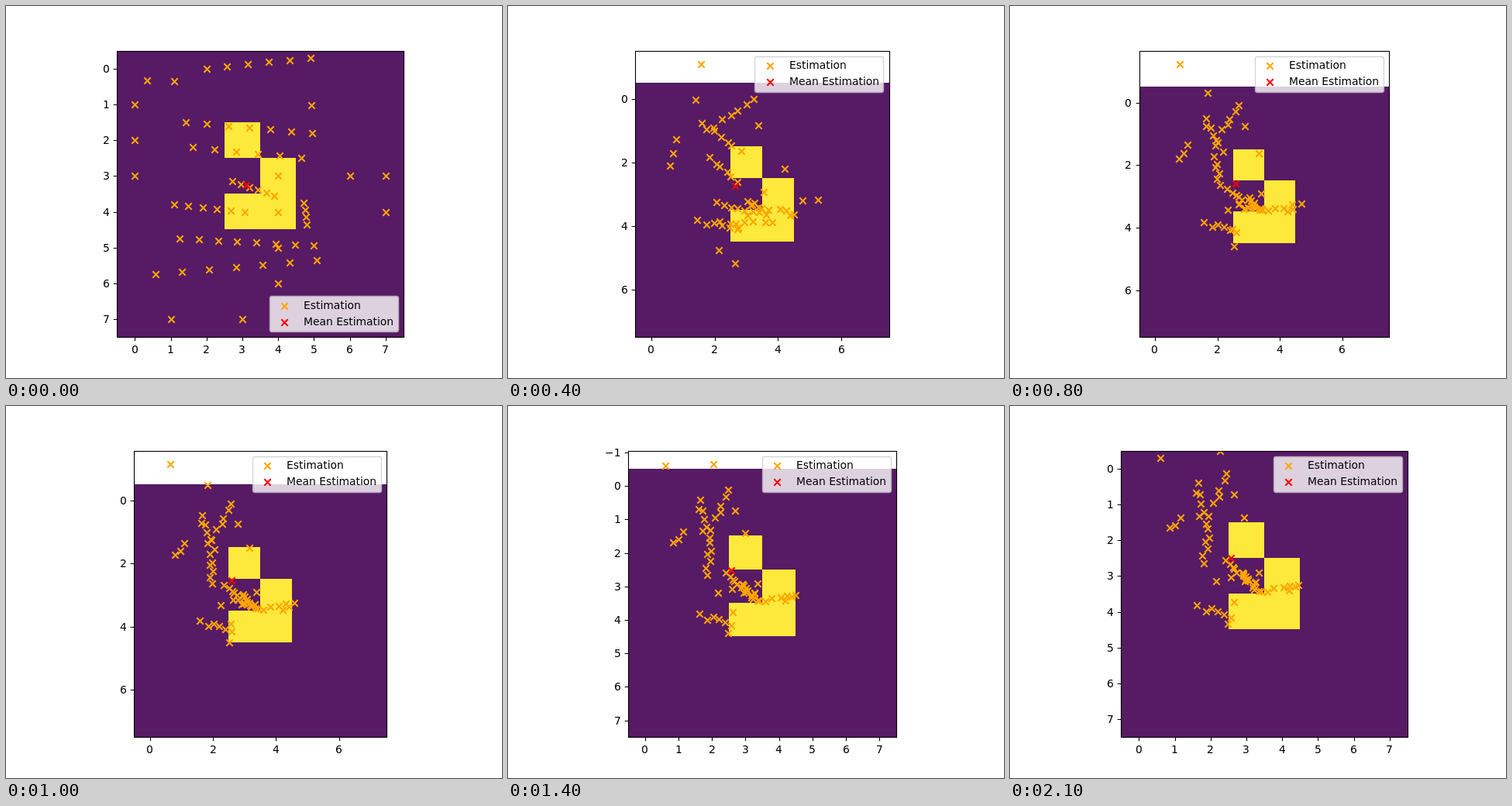
These frames come from a looping animation (640 by 480 pixels, 2200 ms). An HTML page:

```html
<!DOCTYPE html>
<html lang="en">
<head>
<meta charset="utf-8">
<title>Estimation scatter</title>
<style>
  html, body { margin: 0; width: 100%; height: 100%; overflow: hidden; background: #fff; }
  svg { display: block; width: 640px; height: 480px; }
  text { font: 13.89px "DejaVu Sans", sans-serif; fill: #000; }
  .x { fill: none; stroke-width: 2.08; }
  .axis { fill: none; stroke: #000; stroke-width: 1.11; }
</style>
</head>
<body>
<svg id="plot" viewBox="0 0 640 480"></svg>
<script>
const LOOP = 2200, STEP = 100;
const TOP = 57.6, BOTTOM = 427.2, CENTER = 328;
const BACK = '#571a65', CELL = '#fde93b', ORANGE = '#ffa500', RED = '#f00';
const DIGIT = 8.84, MINUS = 11.64;
const LEGEND = { w: 166.35, h: 46.1, gap: 6.94 };
const SETTLE = 350, SPREAD = 0.2;

let seed = 7;
const random = () => (seed = seed * 16807 % 2147483647) / 2147483647;
const lerp = (a, b, k) => a.map((v, i) => v + (b[i] - v) * k);
const settle = (t, tau) => 1 - Math.exp(-t / tau);

// A strand is n points spread evenly on a line that travels to a second line.
function strand(n, [a, b], [c, d]) {
  return Array.from({ length: n }, (_, i) => ({
    from: lerp(a, b, i / (n - 1)),
    to: lerp(c, d, i / (n - 1)).map(v => v + (random() - 0.5) * SPREAD)
  }));
}

const points = [
  // rows of the starting grid
  strand(6, [[2, 0], [4.9, -0.3]], [[2.05, 1.25], [2.4, 0.1]]),
  strand(7, [[1.43, 1.5], [4.95, 1.8]], [[1.6, 0.45], [1.78, 1.5]]),
  strand(6, [[1.62, 2.2], [4.65, 2.5]], [[1.9, 1.65], [1.82, 2.69]]),
  strand(6, [[2.73, 3.15], [3.9, 3.55]], [[3.1, 3.25], [3.5, 3.54]]),
  strand(6, [[1.1, 3.8], [3.07, 4]], [[1.65, 3.85], [2.6, 4.15]]),
  strand(8, [[1.25, 4.75], [5, 4.95]], [[2.4, 2.6], [2.95, 3.05]]),
  strand(7, [[0.57, 5.75], [5.07, 5.35]], [[2.95, 3], [3.2, 3.25]]),
  strand(2, [[1, 7], [3, 7]], [[2.66, 3.7], [2.55, 4.25]]),
  // columns and the right-hand fringe
  strand(3, [[0, 1], [0, 3]], [[1.08, 1.3], [0.8, 1.7]]),
  strand(4, [[4, 3], [4, 6]], [[3.44, 2.95], [2.1, 3.15]]),
  strand(4, [[4.72, 3.75], [4.8, 4.35]], [[3.72, 3.4], [4.45, 3.3]]),
  strand(2, [[6, 3], [7, 3]], [[4.3, 3.2], [4.41, 3.17]]),
  strand(2, [[4.93, 1.03], [7, 4]], [[2.75, 0.64], [2.98, 1.26]])
].flat();

// Two scouts leave the grid and stretch the y axis; keys are [time, x, y].
const scouts = [
  [[0, 0.34, 0.33], [200, 2.24, -0.89], [600, 0.92, -1.31], [1000, 0.65, -1.148],
    [1400, 0.61, -0.61], [2100, 0.6, -0.3]],
  [[0, 1.1, 0.35], [1000, 1.84, -0.48], [1400, 2.04, -0.648], [1800, 2.22, -0.6], [2100, 2.27, -0.49]]
];

function along(keys, t) {
  const i = Math.max(1, keys.findIndex(k => k[0] >= t));
  const [a, b] = [keys[i - 1], keys[i]];
  return lerp(a, b, (t - a[0]) / (b[0] - a[0])).slice(1);
}

function cloudAt(t) {
  const k = settle(t, SETTLE);
  return [...points.map(p => lerp(p.from, p.to, k)), ...scouts.map(s => along(s, t))];
}

const meanAt = t => [3.12 - 0.54 * settle(t, 200), 3.26 - 0.76 * settle(t, SETTLE)];

// Equal-aspect axes: x runs from -0.5 to 7.5, y from top down to 7.5.
function axes(top) {
  const s = (BOTTOM - TOP) / (7.5 - top);
  return {
    top, s, left: CENTER - 4 * s, right: CENTER + 4 * s,
    x: v => CENTER + (v - 3.5) * s,
    y: v => TOP + (v - top) * s
  };
}

const snap = v => Math.round(v) + 0.5;
const cross = (x, y) => `M${snap(x) - 4.17} ${snap(y) - 4.17}l8.34 8.34m0-8.34l-8.34 8.34`;
const marks = (color, d) => `<path class="x" stroke="${color}" d="${d}"/>`;
const label = (x, y, str) => `<text x="${Math.round(x)}" y="${Math.round(y)}">${str}</text>`;

function block(ax, x0, y0, x1, y1, color) {
  const [l, r] = [x0, x1].map(v => Math.round(ax.x(v)));
  const [t, b] = [y0, y1].map(v => Math.floor(ax.y(v)));
  return `<rect x="${l}" y="${t}" width="${r - l}" height="${b - t}" fill="${color}"/>`;
}

function ticks(ax) {
  const xStep = ax.s * 8 * 0.72 / 30 < 8 ? 2 : 1;
  const yStep = 7.5 - ax.top > 9 ? 2 : 1;
  let d = '', text = '';
  for (let v = 0; v < 7.5; v += xStep) {
    d += `M${snap(ax.x(v))} 427.5v4.86`;
    text += label(ax.x(v) - DIGIT / 2, 448, v);
  }
  for (let v = Math.ceil(ax.top / yStep) * yStep; v < 7.5; v += yStep) {
    const width = DIGIT + (v < 0 ? MINUS : 0);
    d += `M${snap(ax.left)} ${snap(ax.y(v))}h-4.86`;
    text += label(ax.left - 9.72 - width, ax.y(v) + 5, (v < 0 ? '\u2212' : '') + Math.abs(v));
  }
  return `<path class="axis" d="${d}"/>` + text;
}

// The legend takes the corner that covers the fewest points.
function legend(ax, dots) {
  const { w, h, gap } = LEGEND;
  const l = ax.left + gap, r = ax.right - gap - w, t = TOP + gap, b = BOTTOM - gap - h;
  const hits = ([x, y]) =>
    dots.filter(([px, py]) => px > x && px < x + w && py > y && py < y + h).length;
  const [x, y] = [[r, t], [l, t], [l, b], [r, b]].reduce((m, c) => hits(c) < hits(m) ? c : m);
  const row = (color, str, dy) =>
    marks(color, cross(x + 19.45, y + 12.5 + dy)) + label(x + 44.45, y + 16.9 + dy, str);
  return `<rect x="${snap(x)}" y="${snap(y)}" width="${Math.round(w)}" height="${Math.round(h)}" rx="2.78"
    fill="#fff" stroke="#ccc" stroke-width="1.39" opacity="0.8"/>` +
    row(ORANGE, 'Estimation', 0) + row(RED, 'Mean Estimation', 21);
}

const plot = document.getElementById('plot');

function draw(t) {
  const cloud = cloudAt(t);
  const low = Math.min(...cloud.map(p => p[1]));
  const ax = axes(low < -0.5 ? low - (7.5 - low) * 0.05 : -0.5);
  const place = ([x, y]) => [ax.x(x), ax.y(y)];
  const dots = cloud.map(place);
  const l = snap(ax.left), w = snap(ax.right) - l;
  plot.innerHTML =
    `<clipPath id="area"><rect x="${l}" y="58" width="${w}" height="370"/></clipPath>` +
    `<g clip-path="url(#area)">` +
    block(ax, -0.5, -0.5, 7.5, 7.5, BACK) +
    block(ax, 2.5, 1.5, 3.5, 2.5, CELL) +
    block(ax, 3.5, 2.5, 4.5, 4.5, CELL) +
    block(ax, 2.5, 3.5, 3.5, 4.5, CELL) +
    dots.map(p => marks(ORANGE, cross(...p))).join('') +
    marks(RED, cross(...place(meanAt(t)))) + `</g>` +
    ticks(ax) +
    `<rect class="axis" x="${l}" y="58.5" width="${w}" height="369"/>` +
    legend(ax, dots);
}

let shown = -1;
function tick() {
  const step = Math.floor(performance.now() % LOOP / STEP);
  if (step !== shown) draw((shown = step) * STEP);
  requestAnimationFrame(tick);
}
tick();
</script>
</body>
</html>
```
